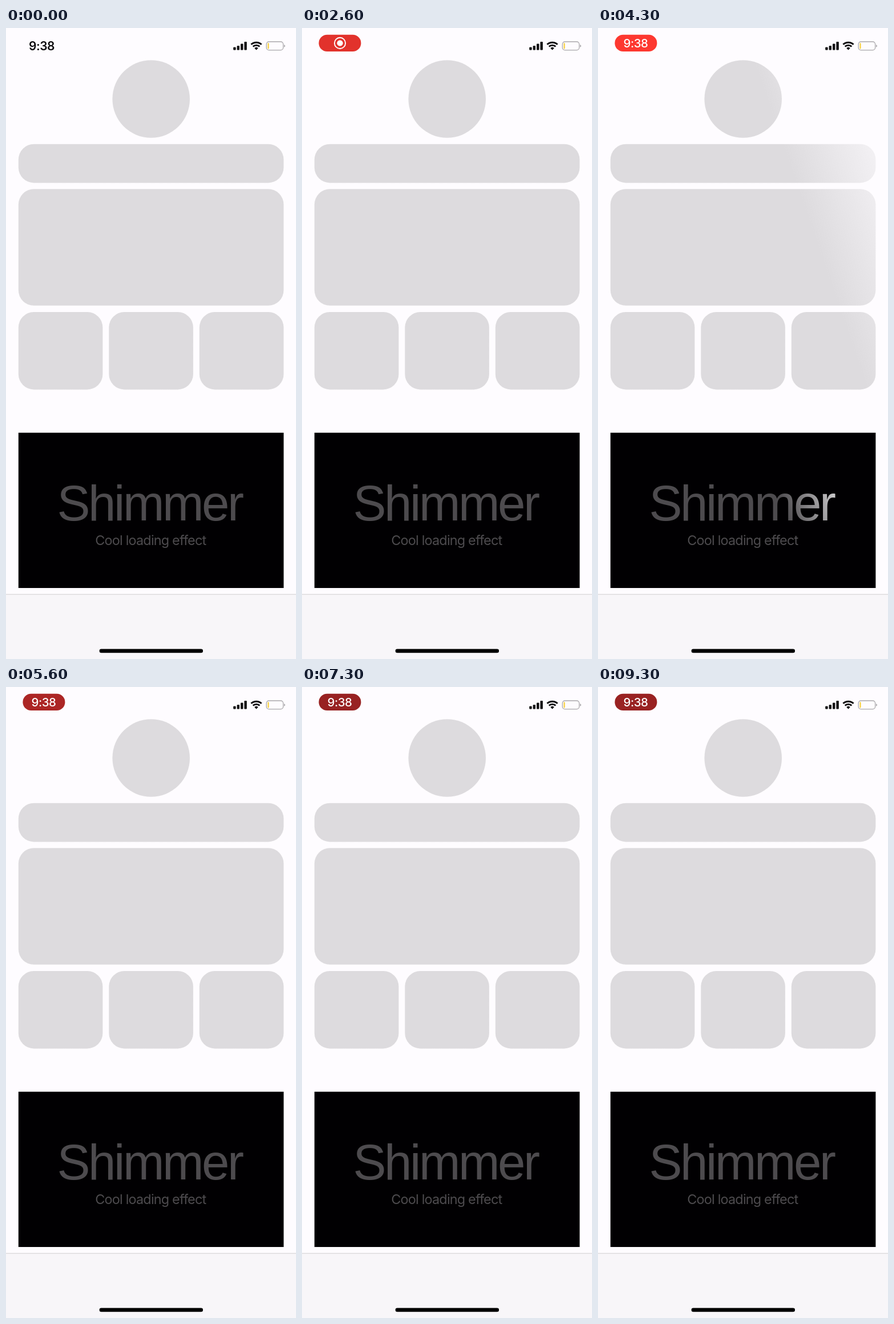
An HTML page that plays this animation: 508x1102 px, repeating every 9.4 s.

```html
<!DOCTYPE html>
<html lang="en">
<head>
<meta charset="utf-8">
<title>Shimmer</title>
<style>
  html, body { margin: 0; width: 100%; height: 100%; overflow: hidden; background: #fefcff; }
  svg { display: block; width: 100%; height: 100%; }
  text { font-family: Inter, "Liberation Sans", sans-serif; }
  #title { font-family: "Liberation Sans", Arial, sans-serif; }
</style>
</head>
<body>
<svg viewBox="0 0 508 1102" xmlns="http://www.w3.org/2000/svg">
  <defs>
    <linearGradient id="cardBeam" gradientUnits="userSpaceOnUse">
      <stop offset="0" stop-color="#dddbde"/>
      <stop offset=".5" stop-color="#f6f4f7"/>
      <stop offset="1" stop-color="#dddbde"/>
    </linearGradient>
    <linearGradient id="textBeam" gradientUnits="userSpaceOnUse">
      <stop offset="0" stop-color="#4d4b4e"/>
      <stop offset=".5" stop-color="#d8d7d9"/>
      <stop offset="1" stop-color="#4d4b4e"/>
    </linearGradient>
  </defs>

  <rect width="508" height="1102" fill="#fefcff"/>

  <!-- status bar -->
  <text id="clock" y="38.5" font-size="21" font-weight="600" fill="#0c0b0d">9:38</text>
  <g id="pill">
    <rect id="pillBody" x="29.4" y="11.8" width="74" height="29.2" rx="14.6"/>
    <g id="record">
      <circle cx="66.5" cy="26.4" r="9.6" fill="none" stroke="#fff" stroke-width="1.9"/>
      <circle cx="66.5" cy="26.4" r="5.2" fill="#fff"/>
    </g>
    <text id="pillClock" y="34" font-size="20.5" font-weight="500" fill="#fff">9:38</text>
  </g>
  <g fill="#0c0b0d">
    <rect x="398.2" y="33.6" width="4.4" height="5" rx="1"/>
    <rect x="404.6" y="31" width="4.4" height="7.6" rx="1"/>
    <rect x="411" y="27.6" width="4.4" height="11" rx="1"/>
    <rect x="417.4" y="24" width="4.4" height="14.6" rx="1"/>
    <path d="M438.5 38.6L435.2 35A4.9 4.9 0 0 1 441.8 35Z"/>
  </g>
  <g fill="none" stroke="#0c0b0d" stroke-width="2.9">
    <path d="M432.7 32.4A8.5 8.5 0 0 1 444.3 32.4"/>
    <path d="M429.4 28.8A13.3 13.3 0 0 1 447.6 28.8"/>
  </g>
  <rect x="456.2" y="24" width="29.4" height="14.6" rx="4.4" fill="none" stroke="#a9a7aa" stroke-width="1.3"/>
  <path d="M487 28.9Q488.9 29.6 488.9 31.3T487 33.7Z" fill="#a9a7aa"/>
  <rect x="458.4" y="26.2" width="2.2" height="10.2" rx="1" fill="#f7cf3c"/>

  <!-- placeholders -->
  <g fill="url(#cardBeam)">
    <circle cx="254.2" cy="124" r="67.8"/>
    <rect x="21.8" y="202.8" width="464.6" height="67.6" rx="27"/>
    <rect x="21.8" y="281.3" width="464.6" height="203.5" rx="27"/>
    <rect x="21.8" y="496" width="147.6" height="135.4" rx="27"/>
    <rect x="180.3" y="496" width="147.6" height="135.4" rx="27"/>
    <rect x="338.8" y="496" width="147.6" height="135.4" rx="27"/>
  </g>

  <rect x="21.8" y="706.8" width="464.6" height="271.2" fill="#010002"/>
  <g fill="url(#textBeam)">
    <text id="title" y="860" font-size="87">Shimmer</text>
    <text id="subtitle" y="903.3" font-size="23.4">Cool loading effect</text>
  </g>

  <!-- bottom bar -->
  <rect y="989" width="508" height="113" fill="#f8f6f9"/>
  <rect y="988.6" width="508" height="1" fill="#cfcdd0"/>
  <rect x="163.6" y="1084.6" width="181.4" height="6.6" rx="3.3" fill="#000"/>
</svg>
<script>
const $ = id => document.getElementById(id);
const LOOP = 9400, STEP = 100;
const SLANT = 0.346;              // beam lean, dx per dy
const SPEED = 1.81;               // beam travel, px per ms
const START = -400;               // beam position when a sweep begins
const SWEEPS = [1463, 3838, 6144, 8478];
const SWEEP_TIME = 650;

const clamp = v => Math.min(1, Math.max(0, v));
const ramp = (t, from, to) => clamp((t - from) / (to - from));

// Tracks a line of text so that it starts and ends on the layout's edges.
function place(id, left, right) {
  const el = $(id), ctx = document.createElement('canvas').getContext('2d');
  const css = getComputedStyle(el);
  ctx.font = `${css.fontWeight} ${css.fontSize} ${css.fontFamily}`;
  const m = ctx.measureText(el.textContent);
  const ink = m.actualBoundingBoxLeft + m.actualBoundingBoxRight;
  el.style.letterSpacing = (right - left - ink) / (el.textContent.length - 1) + 'px';
  el.setAttribute('x', left + m.actualBoundingBoxLeft);
}

function setupBeam(id, half) {
  const len = 2 * half / (1 + SLANT * SLANT);
  const ends = { x1: -half, y1: 0, x2: len - half, y2: -SLANT * len };
  for (const key in ends) $(id).setAttribute(key, ends[key]);
}

function moveBeam(id, x) {
  $(id).setAttribute('gradientTransform', `translate(${x} 0)`);
}

function pillColor(t) {
  const glow = t < 2250 ? 1 : (1 + Math.cos((t - 2250) / 2033 * 2 * Math.PI)) / 2;
  const mix = (dark, bright) => Math.round(dark + (bright - dark) * glow);
  return `rgb(${mix(152, 253)},${mix(34, 56)},${mix(34, 48)})`;
}

function draw(t) {
  const start = SWEEPS.find(s => t >= s && t < s + SWEEP_TIME);
  const x = start === undefined ? -2000 : START + (t - start) * SPEED;
  moveBeam('cardBeam', x);
  moveBeam('textBeam', 145 + 0.66 * x - SLANT * 830);

  const shown = ramp(t, 0, 400), swap = ramp(t, 3300, 3600);
  $('clock').style.opacity = 1 - shown;
  $('pill').style.opacity = shown;
  $('record').style.opacity = 1 - swap;
  $('pillClock').style.opacity = swap;
  $('pillBody').setAttribute('fill', pillColor(t));
}

place('clock', 41, 85);
place('pillClock', 45.5, 87);
place('title', 92.5, 416);
place('subtitle', 157.3, 351.5);
setupBeam('cardBeam', 183);
setupBeam('textBeam', 112);

const begin = performance.now();
function tick() {
  const t = (performance.now() - begin) % LOOP;
  draw(Math.floor(t / STEP) * STEP);
  requestAnimationFrame(tick);
}
tick();
</script>
</body>
</html>
```
